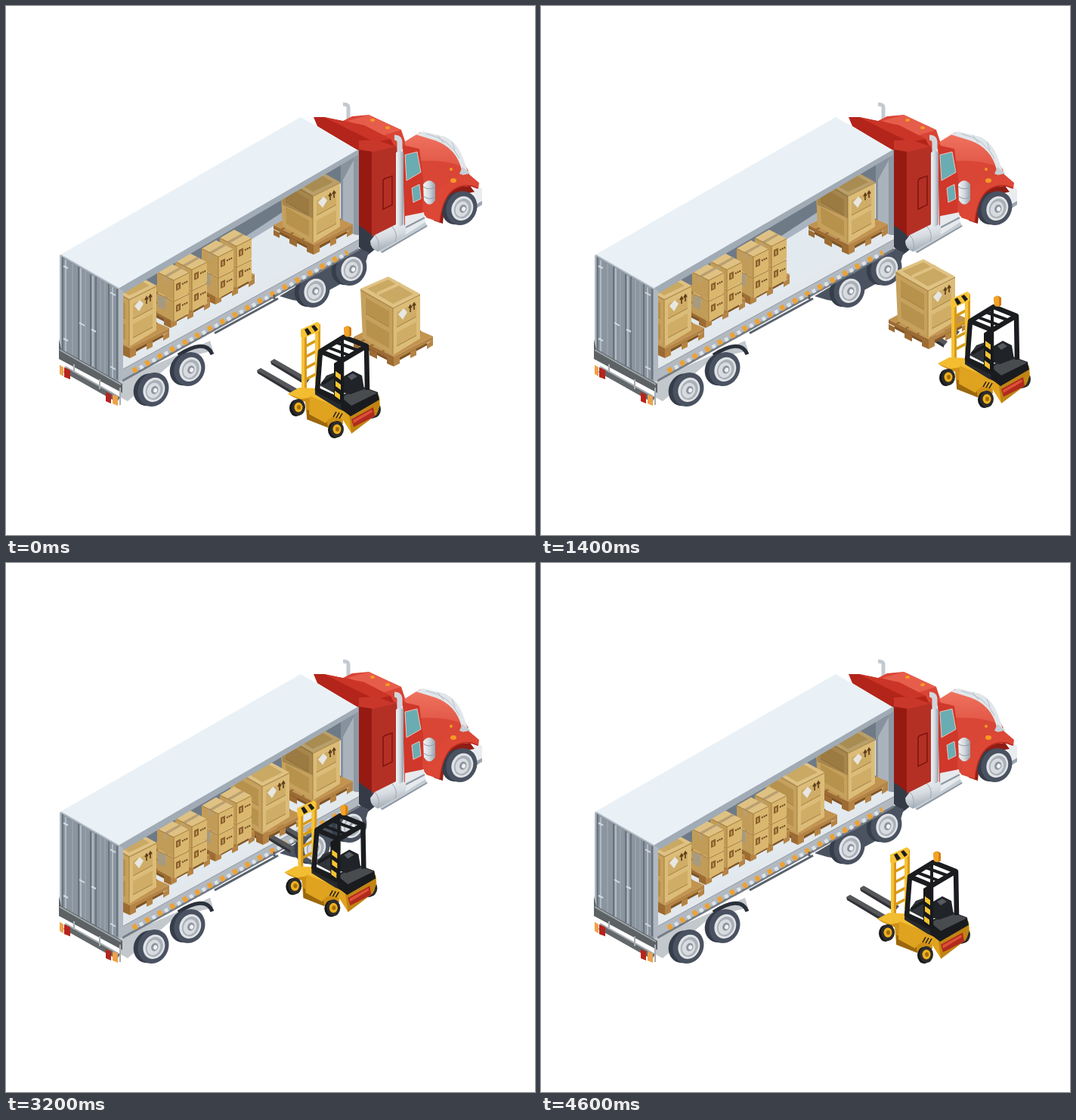
These frames come from a looping animation (700x700 px, 4800 ms). An HTML page:

```html
<!DOCTYPE html>
<html lang="en">
<head>
<meta charset="utf-8">
<title>Loading a truck</title>
<style>
html, body { margin: 0; height: 100%; overflow: hidden; background: #fff; }
svg { display: block; width: 100vw; height: 100vh; }
</style>
</head>
<body>
<svg viewBox="0 0 700 700">
<defs>
  <linearGradient id="hoodShade" x1="0" y1="0" x2="0" y2="1">
    <stop stop-color="#f07460"/><stop offset="1" stop-color="#d63f31"/>
  </linearGradient>
  <linearGradient id="pipeShade">
    <stop stop-color="#f2f5f7"/><stop offset=".5" stop-color="#d3d9df"/><stop offset="1" stop-color="#959faa"/>
  </linearGradient>
  <linearGradient id="tankShade" x1=".3" y1="0" x2=".6" y2="1">
    <stop stop-color="#f3f5f7"/><stop offset=".5" stop-color="#d5dbe0"/><stop offset="1" stop-color="#98a1ab"/>
  </linearGradient>

  <g id="wheel" transform="rotate(24)">
    <ellipse cx="-5" cy="3" rx="19" ry="22" fill="#363d4a"/>
    <ellipse cx="1" rx="20" ry="23" fill="#4a5261"/>
    <ellipse cx="2" rx="14" ry="16.500" fill="#e0e3e6"/>
    <ellipse cx="2.500" rx="11" ry="13.500" fill="#a9b0b8"/>
    <ellipse cx="2" cy="1" rx="8.500" ry="10.500" fill="#d8dbdf"/>
    <ellipse cx="3" rx="4.500" ry="5.500" fill="#8d959f"/>
    <ellipse cx="4" rx="2.500" ry="3" fill="#f0f2f4"/>
  </g>

  <g id="pallet">
    <path fill="#7f5527" d="M468 446 513 469 557 445 557 449 513 473 468 450z"/>
    <path fill="#c2944f" d="M460 438 508 413 565 437 513 464z"/>
    <path stroke="#966a31" stroke-width="2" d="M470 444 520 417M482 450 534 423M498 457 549 430"/>
    <path fill="#9c6b32" d="M460 438 513 464V469L460 443zM460 444 468 448V455L460 451zM481 454 491 459V467L481 462zM504 465 513 469V477L504 473z"/>
    <path fill="#b58444" d="M513 464 565 437V442L513 469zM513 469 521 465V473L513 477zM535 458 543 454V462L535 466zM557 447 565 442V449L557 454z"/>
  </g>

  <g id="crate">
    <use href="#pallet"/>
    <path fill="#dfc283" d="M469 374 506 358 548 381 512 399z"/>
    <path fill="#c9a963" d="M478 374 506 362 539 381 512 394z"/>
    <path stroke="#dfc283" stroke-width="4" d="M491 381 522 367"/>
    <path fill="#c5a15d" d="M469 374 512 399V462L472 440z"/>
    <path fill="#b7924d" d="M476 386 507 404V425L476 407zM476 414 507 432V453L477 436z"/>
    <path fill="#dbbc78" d="M512 399 548 381V440L512 462z"/>
    <path fill="#cfad67" d="M517 405 543 392V411L517 425zM517 432 543 418V436L517 450z"/>
    <path fill="none" stroke="#a5803f" d="M469 376 512 400 548 382M517 425 543 411M517 450 543 436M476 407 507 425M512 400V461"/>
    <path fill="#e7e6e2" d="M519 408 526 400 531 405 525 415z"/>
    <path fill="none" stroke="#5b3c1a" stroke-width="1.600" d="M535 405V398M533 400 535 396 537 399M540 402V395M538 397 540 393 542 396"/>
  </g>

  <g id="box">
    <path fill="#dfc283" d="M0 0 -22 -11 -3 -22 20 -10z"/>
    <path fill="#c19c58" d="M0 0 -22 -11V15L0 27z"/>
    <path fill="#d9b76f" d="M0 0 20 -10V16L0 27z"/>
    <path fill="#b99f72" d="M-13 -6 7 -17 10 -15 -9 -4V3L-13 1z"/>
    <path fill="none" stroke="#a67d3d" d="M-22 -11 0 0 20 -10M0 0V27"/>
    <path fill="#8c602c" d="M3 5 9 2V11L3 14z"/>
    <path stroke="#6d4820" stroke-width="2" stroke-dasharray="2 1" d="M11 5 19 1"/>
    <path stroke="#e9cd8e" d="M6 6V11"/>
  </g>

  <g id="stack">
    <use href="#pallet" x="-295" y="-51"/>
    <use href="#box" x="246" y="377"/>
    <use href="#box" x="246" y="349"/>
    <use href="#box" x="222" y="391"/>
    <use href="#box" x="222" y="363"/>
    <path fill="#8c98a8" opacity=".5" d="M201 382 211 387V402L201 398z"/>
  </g>

  <g id="tire">
    <ellipse cx="-2" cy="1" rx="9" ry="11" fill="#171717"/>
    <ellipse cx="1" rx="9" ry="11" fill="#2b2b2b"/>
    <ellipse cx="1" rx="5.500" ry="6.500" fill="#eeb01c"/>
    <ellipse cx="1.500" rx="2.500" ry="3" fill="#a26c0c"/>
  </g>
</defs>

<g id="cab">
  <path fill="#343b47" d="M466 288 484 300 496 316 478 330 466 318z"/>
  <path fill="none" stroke="#c3cad1" stroke-width="5" d="M453 152V134Q453 130 446 130"/>
  <path fill="#d94435" d="M436 157 458 146 480 144 523 164 530 185 515 196z"/>
  <path fill="#e65d4b" d="M452 152 480 144 523 164 500 171z"/>
  <path fill="#b3241a" d="M407 147 421 147 474 158 509 176 515 188 467 192 412 159z"/>
  <path fill="#cb3527" d="M421 147 474 158 509 176 488 180 455 164z"/>
  <path fill="#961a12" d="M466 189 486 192V304L467 290z"/>
  <path fill="#b43025" d="M484 191 515 184 522 200V293L484 305z"/>
  <path fill="#c9372a" d="M467 178 490 177 515 186 486 193 467 190z"/>
  <path fill="none" stroke="#7e140e" stroke-width="1.500" d="M499 232Q499 229 502 228L511 225V263L499 269z"/>
  <path fill="url(#hoodShade)" d="M527 180 548 167 582 178 602 202 612 218 596 232 568 249 552 241z"/>
  <path fill="#d94636" d="M548 205Q580 203 603 212L612 221 585 235 561 262 550 254z"/>
  <path fill="#cf382b" d="M525 184 547 189 553 236 557 270 527 292z"/>
  <path fill="#d94636" d="M552 235 572 238Q561 257 557 280L551 274z"/>
  <path fill="#e1e6ea" d="M542 170 552 166 581 173Q598 181 605 202L611 219 603 217Q596 188 568 178z"/>
  <path fill="none" stroke="#b4bec7" d="M556 169Q588 176 600 202M571 171 579 181M590 180 594 190"/>
  <path fill="#c7ced5" d="M604 213 614 221 611 226 600 222z"/>
  <path fill="#69adb3" stroke="#ebc4ba" d="M528 197 544 193 549 220 530 231z"/>
  <path fill="#69adb3" stroke="#ebc4ba" d="M537 241 547 236 549 255 539 260z"/>
  <path fill="#e9edf0" d="M619 236 630 242 630 260 618 266z"/>
  <path fill="#9ca6b0" d="M612 268 630 258 630 263 614 273z"/>
  <path fill="#8f1d15" d="M566 284 571 258 592 240 614 238 620 246 600 250 580 266 578 288z"/>
  <use href="#wheel" x="602" y="267"/>
  <path fill="#dc4736" d="M556 276Q563 241 595 226L612 222 626 234 625 242Q607 232 589 246 577 258 574 286L556 280z"/>
  <path fill="none" stroke="#bb291d" stroke-width="1.500" d="M574 287Q577 256 591 244 607 233 624 241"/>
  <path fill="#c5cdd4" d="M488 320 553 284 558 291 498 327z"/>
  <path fill="#e6eaed" d="M528 278 553 273 555 286 528 303z"/>
  <path fill="none" stroke="#8d97a3" stroke-width="2" d="M497 326 557 291M529 293 554 280"/>
  <path fill="url(#tankShade)" d="M488 303 524 285Q533 295 527 305L492 325Q482 321 482 311z"/>
  <path fill="none" stroke="#9fa9b3" d="M488 303Q496 312 492 325M511 292Q519 301 515 312"/>
  <path fill="none" stroke="#d0d6dc" stroke-width="7" d="M521 199V181Q521 174 514 174"/>
  <path fill="url(#pipeShade)" d="M516 194Q521 190 526 194V289Q521 294 516 290z"/>
  <path fill="url(#pipeShade)" d="M552 236Q560 226 568 236V257Q560 268 553 257z"/>
  <path stroke="#929ca7" fill="none" d="M552 239Q560 245 568 239M553 252Q561 258 568 252"/>
  <g fill="#f39a25"><ellipse cx="485" cy="151" rx="3" ry="2"/><ellipse cx="505" cy="161" rx="3" ry="2"/><ellipse cx="592" cy="231" rx="4" ry="3"/><ellipse cx="589" cy="216" rx="2" ry="2"/></g>
</g>

<g id="trailer">
  <path fill="#4b5360" d="M362 384 468 321 480 326 472 352 398 392 379 389z"/>
  <path fill="#c3c8cd" d="M150 495 270 443 274 456 225 468 161 523 150 517z"/>
  <path fill="none" stroke="#2b313a" stroke-width="5" d="M228 462Q264 439 273 461"/>
  <use href="#wheel" x="194" y="507"/><use href="#wheel" x="242" y="480"/>
  <use href="#wheel" x="407" y="376"/><use href="#wheel" x="456" y="347"/>
  <path fill="#e2e9ef" d="M155 378 462 198V305L155 472z"/>
  <path fill="#6f7a87" d="M155 376 462 197V223L155 404z"/>
  <path fill="#a9b4c0" d="M300 316 390 257V269L300 324z"/>
  <path fill="#87929e" d="M443 204 462 195V302L443 292z"/>
  <path fill="#aab3bc" d="M446 230 460 204V302L446 294z"/>
  <path fill="#8d98a4" d="M460 194 467 190V304L460 302z"/>
  <path fill="#e3e8ec" d="M154 470 460 303 467 303 467 310 154 481z"/>
  <path fill="#b2b9c0" d="M154 481 467 309V321L154 495z"/>
  <path fill="none" stroke="#737c86" stroke-width="3" d="M154 496 467 322"/>
  <path fill="none" stroke="#8e99a5" d="M154 481 467 309"/>
  <path fill="none" stroke="#dfe3e7" stroke-width="5" stroke-dasharray="5 13.900" d="M177 479 452 327"/>
  <path fill="none" stroke="#eda235" stroke-width="7" stroke-dasharray="6 12.900" d="M168 483 452 326"/>
  <path fill="none" stroke="#59626d" stroke-width="3" d="M276 433 360 387M355 382V388"/>
  <use href="#crate" x="-106" y="-148"/>
  <path fill="#49371c" opacity=".25" d="M363 226 400 210 442 233 406 251V281L366 263z"/>
</g>

<g id="forks">
  <path fill="#55575a" d="M332 482 337 479 386 507 381 513zM350 470 355 467 402 494 397 500z"/>
  <path fill="#303236" d="M332 482 381 511V515L333 486zM350 470 397 498V502L351 474z"/>
</g>

<use id="cargo" href="#crate"/>

<g id="load">
  <use href="#stack" x="59" y="-31"/>
  <use href="#stack"/>
  <use href="#crate" x="-349" y="-11"/>
</g>

<g id="shell">
  <path fill="#e9f1f6" d="M72 329 390 147 466 191 150 374z"/>
  <path fill="#a1abb5" d="M150 373 466 190 466 197 154 381z"/>
  <path fill="#8b959f" d="M72 329 150 374V500L72 455z"/>
  <path fill="#b0b9c2" d="M149 374 155 377V494L149 498z"/>
  <path fill="none" stroke="#69737e" stroke-width="2" d="M75 332V455M96 345V467M112 355V476M119 358V481M136 368V490M147 374V494"/>
  <path fill="none" stroke="#b1bac3" stroke-width="2" d="M73 330 149 374M79 336V457M99 347V469M115 357V477M141 372V492M72 330V455"/>
  <path fill="none" stroke="#a1abb5" d="M88 341V462M105 351V472M125 362V484M131 365V487"/>
  <path stroke="#d4dbe2" stroke-width="2" d="M76 344 82 347M76 440 82 443M138 379 145 383M138 477 145 481M97 419 104 423M113 428 119 431"/>
  <path fill="#5d6265" d="M70 441 73 454 154 500V512L70 467z"/>
  <path stroke="#a3a9ad" stroke-width="2" d="M71 455 152 501"/>
  <path stroke="#62676a" stroke-width="8" d="M78 481 149 521"/>
  <path stroke="#a9aeb2" stroke-width="2" d="M78 477 149 517M90 474V485M124 494V507M151 505V528"/>
  <path fill="#efa14a" d="M71 475 76 478V490L71 487zM141 514 148 517V529L141 526z"/>
  <path fill="#b6241c" d="M77 478 85 482V494L77 491zM132 511 139 514V526L132 523z"/>
</g>

<g id="forklift">
  <use href="#tire" x="486" y="534"/>
  <g id="mast">
    <path fill="#d69a17" d="M397 448 410 441V445L397 452zM397 462 410 455V459L397 466zM397 477 410 470V474L397 481zM397 492 410 485V489L397 496z"/>
    <path fill="#f6c337" d="M391 430 397 433V515L391 512zM409 421 415 421V502L409 500z"/>
    <path fill="#d9991a" d="M395 432 398 431V514L395 514zM413 422 416 421V502L413 502z"/>
    <path fill="#f6c337" d="M390 428 412 418 415 420V430L393 440 390 438z"/>
    <path fill="#1d1d1d" d="M395 428 399 426 404 433 399 436zM404 424 408 422 413 428 409 431z"/>
  </g>
  <path fill="#f3bd31" d="M373 513 388 505 413 506 446 529 440 543 402 521 390 522z"/>
  <path fill="#cf9016" d="M373 513 390 520 403 518 445 538 446 552 437 563 426 557 398 545 396 524 379 517z"/>
  <path fill="#9c680d" d="M398 534 424 546 426 558 398 547z"/>
  <path fill="#dfa31f" d="M402 516 445 533 454 540 494 516 495 528 490 540 457 565 446 548Q431 538 423 552L401 540z"/>
  <path fill="#c08414" d="M454 542 494 520V530L490 541 457 566z"/>
  <path fill="#b02a1e" d="M457 547 486 531 488 543 460 557z"/>
  <path fill="#dc5138" d="M459 548 484 534 485 537 460 552z"/>
  <use href="#tire" x="386" y="531"/><use href="#tire" x="437" y="560"/>
  <path fill="#26292d" d="M409 503 440 517 470 503 492 511V520L456 540 440 533 409 514z"/>
  <path fill="#494c4f" d="M444 518 470 504 491 512 457 529z"/>
  <path fill="#191b1e" d="M443 518 457 529 492 512 494 521 456 543 443 533z"/>
  <path fill="#303338" d="M415 502 424 489 438 484 441 497 436 513z"/>
  <path fill="#202327" d="M447 490 459 483 471 489 474 507 455 514 445 511z"/>
  <path fill="#555a60" d="M452 490 459 486 465 490 457 495z"/>
  <path fill="none" stroke="#1a1c1f" stroke-width="6.500" stroke-linejoin="round" d="M412 509 416 457 447 438 477 450 478 508M416 457 445 469 477 450M444 468V526M412 508 443 524"/>
  <path fill="none" stroke="#1a1c1f" stroke-width="4" d="M424 451 456 463M434 444 467 456M445 437V484M418 500 440 487"/>
  <path fill="#17191b" d="M434 473 443 467 447 526 434 519z"/>
  <path fill="#f6c431" d="M436 483 443 488V495L436 490zM436 496 443 501V508L436 503zM435 509 442 514V521L435 516z"/>
  <path stroke="#17191b" stroke-width="1.500" d="M433 544 437 537M437 545 441 538M441 546 445 539"/>
  <path fill="#d27d13" d="M447 426Q452 421 457 426V436Q452 440 448 436z"/>
  <path fill="#f2a327" d="M447 426Q452 421 454 426V437Q449 438 448 436z"/>
</g>
</svg>
<script>
const STEP = 200, LOOP = 4800, PICK = 5, DROP = 14;
// [step, x, y, fork lift]
const keys = [
  [0, 0, 0, 0], [1, 128, 50, 0], [2, 172, 23, 0], [3, 204, 0, 0], [4, 174, -27, 0],
  [PICK, 152, -40, 0], [7, 152, -40, 23], [9, 152, -40, 39], [10, 97, -59, 38],
  [12, -4, -107, 37], [13, -21, -116, 38], [DROP, -21, -116, 28], [15, -21, -116, 28],
  [18, 28, -79, 26], [21, 58, -54, 4], [23, 72, -42, -2]
];
const [forks, cargo, forklift] = ['forks', 'cargo', 'forklift'].map(id => document.getElementById(id));

function pose(step) {
  const i = Math.max(1, keys.findIndex(k => k[0] >= step));
  const a = keys[i - 1], b = keys[i];
  const p = (step - a[0]) / (b[0] - a[0]);
  return [1, 2, 3].map(n => a[n] + (b[n] - a[n]) * p);
}

const place = (el, x, y) => el.setAttribute('transform', `translate(${x} ${y})`);

function draw(now) {
  const step = Math.floor(now % LOOP / STEP);
  const [x, y, lift] = pose(step);
  place(forklift, x, y);
  place(forks, x, y - lift);
  const [homeX, homeY] = pose(PICK);
  const [cx, cy, raised] = pose(Math.min(DROP, Math.max(PICK, step)));
  place(cargo, cx - homeX, cy - homeY - raised);
  requestAnimationFrame(draw);
}
draw(0);
</script>
</body>
</html>
```
